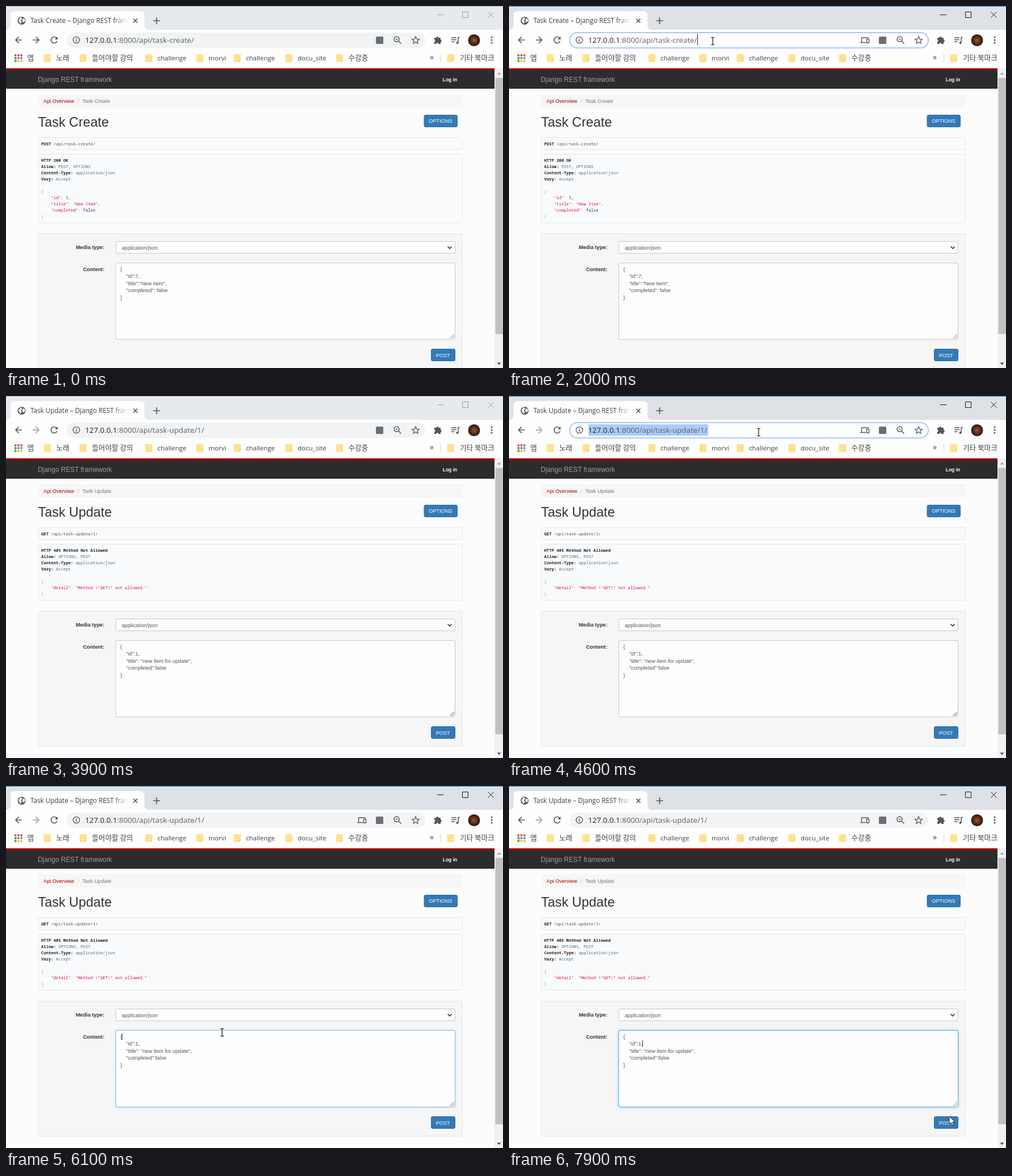
These frames come from a looping animation (876 px wide and 639 px high, 8000 ms). An HTML page:

```html
<!DOCTYPE html>
<html lang="en">
<head>
<meta charset="utf-8">
<title>API task demo</title>
<style>
html, body { margin: 0; width: 100%; height: 100%; overflow: hidden; background: #fcfcfc; }
svg { display: block; width: 876px; height: 639px; }
text { white-space: pre; }
.ui { font: 11.5px "Open Sans", "Noto Sans", sans-serif; fill: #3c4043; }
.ko { font: 12.6px "Noto Sans CJK KR", "Noto Sans CJK", sans-serif; fill: #3c4043; }
.url { font-size: 13.3px; fill: #5f6368; }
.url tspan { fill: #202124; }
.page { font: 9.2px "Liberation Sans", Arial, sans-serif; fill: #333; }
.h1 { font-size: 23.4px; }
.b, .code tspan.k { font-weight: bold; }
.code { font: 7.24px "Noto Sans Mono", monospace; fill: #555; }
.code .k { fill: #222; }
.code .l { fill: #4a6d8c; }
.code .s { fill: #d14; }
.code .p { fill: #93a1a1; }
.code .w { fill: #1e347b; }
.area { fill: #555; }
.line { fill: none; stroke: #54585c; stroke-width: 1.7; }
.btn rect { fill: #337ab7; stroke: #2e6da4; }
.btn text { fill: #fff; }
.ctl { fill: none; stroke: currentColor; }

/* every part shares one 8 s clock; 1% = 80 ms */
.t { animation: 8s step-end -20ms infinite; }
.create { animation-name: create; }
.update { animation-name: update; }
.strip { animation-name: strip; }
.edge { animation-name: edge; }
.ctl { animation-name: ctl; }
.act { animation-name: act; }
.ring { animation-name: ring; }
.sel { animation-name: sel; }
.pillhov { animation-name: pillhov; }
.bookhov { animation-name: bookhov; }
.caret0 { animation-name: caret0; }
.caret1 { animation-name: caret1; }
.caret2 { animation-name: caret2; }
.shown { animation-name: shown; }
.beam { animation-name: beam; }
.arrow { animation-name: arrow; }
.glow { animation-name: glow; animation-timing-function: linear; filter: drop-shadow(0 0 2.5px rgba(102,175,233,.7)); }
.move { animation-name: move; animation-timing-function: linear; }

@keyframes create { 0% { opacity: 1 } 47.5%, 100% { opacity: 0 } }
@keyframes update { 0% { opacity: 0 } 47.5%, 100% { opacity: 1 } }
@keyframes strip { 0%, 47.5% { fill: #e7eaed } 25%, 56.25%, 100% { fill: #dee1e6 } }
@keyframes edge { 0%, 47.5% { fill: #b4b6b8 } 25%, 56.25%, 100% { fill: #1883d7 } }
@keyframes ctl { 0%, 47.5% { color: #999b9d } 25%, 56.25%, 100% { color: #151515 } }
@keyframes act { 0%, 47.5% { opacity: 0 } 25%, 56.25%, 100% { opacity: 1 } }
@keyframes ring { 0%, 47.5%, 76.25%, 100% { opacity: 0 } 25%, 56.25% { opacity: 1 } }
@keyframes sel { 0%, 76.25%, 100% { opacity: 0 } 56.25% { opacity: 1 } }
@keyframes pillhov { 0%, 25%, 100% { fill: #f1f3f4 } 18.75% { fill: #e9ebee } }
@keyframes bookhov { 0%, 18.75%, 100% { opacity: 0 } 15% { opacity: 1 } }
@keyframes caret0 { 0%, 37.5%, 47.5%, 100% { opacity: 0 } 25%, 43.75% { opacity: 1 } }
@keyframes caret1 { 0%, 83.75%, 100% { opacity: 0 } 76.25% { opacity: 1 } }
@keyframes caret2 { 0%, 91.25% { opacity: 0 } 85%, 97.5%, 100% { opacity: 1 } }
@keyframes glow { 0%, 76.2% { opacity: 0 } 76.25% { opacity: .45 } 78.5%, 100% { opacity: 1 } }
@keyframes shown { 0%, 40% { opacity: 0 } 1.25%, 50%, 100% { opacity: 1 } }
@keyframes beam { 0%, 18.75%, 55%, 73%, 100% { opacity: 1 } 10%, 50%, 67%, 94.5% { opacity: 0 } }
@keyframes arrow { 0%, 18.75%, 55%, 73% { opacity: 0 } 10%, 50%, 67%, 94.5%, 100% { opacity: 1 } }
@keyframes move {
  0%, 1.25% { transform: translate(680px, 484px) }
  3.75% { transform: translate(700px, 524px) }
  7.5%, 8.75% { transform: translate(718px, 517px) }
  11.25%, 12.5% { transform: translate(328px, 162px) }
  16.25% { transform: translate(290px, 92px) }
  20%, 25% { transform: translate(358px, 62px) }
  31.25%, 48.75% { transform: translate(383px, 61px) }
  50% { transform: translate(560px, 330px) }
  56.25%, 58% { transform: translate(440px, 64px) }
  60%, 62.5% { transform: translate(456px, 62px) }
  65%, 66.5% { transform: translate(500px, 47px) }
  70% { transform: translate(742px, 200px) }
  73.75%, 75% { transform: translate(382px, 442px) }
  76.25%, 76.6% { transform: translate(381px, 435px) }
  80%, 82.5% { transform: translate(364px, 446px) }
  86.25%, 87.75% { transform: translate(364px, 453px) }
  96.25% { transform: translate(780px, 589px) }
  98.75%, 100% { transform: translate(776px, 583px) }
}
</style>
</head>
<body>
<svg viewBox="0 0 876 639">
<defs>
  <g id="folder">
    <path d="M2 0h9.500q1.500 0 1.500 1.500V10l-3 4H2q-1.500 0-1.500-1.500v-11Q.5 0 2 0z" fill="#ffe28f"/>
    <path d="M13 10l-3 4V11q0-1 1-1z" fill="#f3c653"/>
  </g>
  <linearGradient id="fade"><stop offset="0" stop-color="#fefefe" stop-opacity="0"/><stop offset="1" stop-color="#fefefe"/></linearGradient>
  <radialGradient id="face"><stop offset="0" stop-color="#a0572b"/><stop offset=".55" stop-color="#5c2d18"/><stop offset="1" stop-color="#241714"/></radialGradient>
  <clipPath id="tab"><path d="M40 10h174v30H40z"/></clipPath>
</defs>

<!-- browser frame -->
<rect class="t strip" width="876" height="42" fill="#e7eaed"/>
<rect class="t edge" width="876" height="1" fill="#b4b6b8"/>
<path d="M0 42Q8 42 8 34V17Q8 9 16 9H236Q244 9 244 17V34Q244 42 252 42H876V110H0z" fill="#fefefe"/>
<circle cx="27.500" cy="26" r="7" fill="#55595d"/>
<path d="M22 24q3-1 3-4l3 1q1 3-2 4l2 3-2 3q-3-1-4-7zM30 22l3 1 .5 4-3 2-2-3z" fill="#fefefe"/>
<g class="ui" clip-path="url(#tab)" style="font-size:11.700px">
  <text class="t create" x="43" y="30">Task Create – Django REST framework</text>
  <text class="t update" x="43" y="30">Task Update – Django REST framework</text>
</g>
<rect x="190" y="12" width="25" height="28" fill="url(#fade)"/>
<path class="line" d="M224.500 22.500l7 7m0-7l-7 7M265.500 20v12m-6-6h12"/>
<g class="t ctl">
  <path d="M760 15.500h11M804.500 10.500h10v10h-10zM849.500 10.500l10 10m0-10l-10 10"/>
</g>

<!-- address row -->
<path class="line" d="M28 60H17m5.500-5.500L17 60l5.500 5.500"/>
<path class="line" d="M47 60h11m-5.500-5.500L58 60l-5.500 5.500"/>
<path class="line t update" style="stroke:#bcbfc3" d="M47 60h11m-5.500-5.500L58 60l-5.500 5.500"/>
<path class="line" d="M89.500 57A5.500 5.500 0 1 0 90 62"/>
<path d="M91 54v5h-5z" fill="#54585c"/>
<rect class="t pillhov" x="107" y="47" width="632" height="27" rx="13.500" fill="#f1f3f4"/>
<rect class="t ring" x="107" y="47" width="632" height="27" rx="13.500" fill="#fefefe" stroke="#a9c9f6" stroke-width="2"/>
<circle class="line" cx="124" cy="60" r="5.700" style="stroke-width:1.300"/>
<path d="M123.300 59h1.500v4h-1.500zM123.300 56.700h1.500v1.400h-1.500z" fill="#54585c"/>
<rect class="t sel" x="140" y="50" width="211" height="20" fill="#abcaf8"/>
<g class="ui">
  <text class="url t create" x="139.500" y="65"><tspan>127.0.0.1</tspan>:8000/api/task-create/</text>
  <text class="url t update" x="139.500" y="65"><tspan>127.0.0.1</tspan>:8000/api/task-update/1/</text>
</g>
<rect class="t caret0" x="332" y="49" width="1" height="20" fill="#222"/>
<g class="t act">
  <path class="line" style="stroke-width:1.400" d="M634 56h-12.500v7.500M619 64.500h10M630.500 58.500h4v6.500h-4z"/>
</g>
<rect x="652" y="54" width="13" height="13" rx="1.500" fill="#6b6f74"/>
<g class="line" style="stroke-width:1.500">
  <circle cx="688.500" cy="58.500" r="4.500"/><path d="M692 62l4.500 4.500M686.500 58.500h4"/>
  <path d="M722 54l1.800 4.300 4.600.4-3.500 3 1 4.500-3.900-2.400-3.900 2.400 1-4.500-3.500-3 4.600-.4z" style="stroke-width:1.300"/>
  <path d="M785 56h9M785 59.500h9M785 63h5.500M797 65v-9.500h3"/>
</g>
<circle cx="795.500" cy="65" r="2" fill="#54585c"/>
<path d="M755 56h3.500a1.900 1.900 0 1 1 3.800 0H766v3.800a1.900 1.900 0 1 1 0 3.800V67h-3.700a1.900 1.900 0 0 0-3.800 0H755v-3.700a1.900 1.900 0 0 0 0-3.700z" fill="#54585c"/>
<circle cx="825" cy="60.500" r="10.500" fill="url(#face)"/>
<g fill="#54585c"><circle cx="856" cy="55" r="1.600"/><circle cx="856" cy="60" r="1.600"/><circle cx="856" cy="65" r="1.600"/></g>

<!-- bookmarks -->
<rect class="t bookhov" x="238" y="79" width="85" height="25" rx="12.500" fill="#eff1f2"/>
<g stroke-width="3.400" stroke-dasharray="3.400 1.800" fill="none">
  <path d="M15 87h14" stroke="#ea4335"/><path d="M15 92h14" stroke="#4285f4"/><path d="M15 97h14" stroke="#fbbc04"/>
  <path d="M15 92h4M15 97h4" stroke="#34a853"/>
</g>
<use href="#folder" x="66" y="85"/><use href="#folder" x="129" y="85"/>
<use href="#folder" x="245" y="85"/><use href="#folder" x="335" y="85"/>
<use href="#folder" x="401" y="85"/><use href="#folder" x="492" y="85"/>
<use href="#folder" x="581" y="85"/><use href="#folder" x="777" y="85"/>
<g class="ko">
  <text x="37.500" y="96">앱</text><text x="88.500" y="96">노래</text>
  <text x="151.500" y="96">들어야할 강의</text><text x="603.500" y="96">수강중</text>
  <text x="800" y="96">기타 북마크</text>
</g>
<g class="ui">
  <text x="267" y="96">challenge</text><text x="357" y="96">morvi</text>
  <text x="423" y="96">challenge</text><text x="514" y="96">docu_site</text>
  <text x="747" y="95" style="font-size:14px">»</text>
</g>
<path d="M766.500 84v16" stroke="#d5d7da"/>

<!-- web page -->
<rect y="110" width="861" height="529" fill="#fcfcfc"/>
<rect y="110" width="861" height="36" fill="#2c2c2c"/>
<rect y="110" width="861" height="3" fill="#a30000"/>
<rect x="861" y="110" width="15" height="529" fill="#f1f1f1"/>
<rect class="t create" x="862.500" y="127" width="13.500" height="452" fill="#c1c1c1"/>
<rect class="t update" x="862.500" y="127" width="13.500" height="470" fill="#c1c1c1"/>
<path d="M865.500 121l3.500-4 3.500 4z" fill="#a3a3a3"/><path d="M865.500 629.500l3.500 4 3.500-4z" fill="#505050"/>

<g class="page">
  <text x="56" y="134" style="font-size:11.850px;fill:#9d9d9d">Django REST framework</text>
  <text class="b" x="769.700" y="133" style="font-size:8.500px;fill:#fff">Log in</text>
  <rect x="57" y="156" width="748" height="23" rx="2.500" fill="#f6f6f6"/>
  <text x="66" y="171" style="fill:#a30000">Api Overview</text>
  <text x="126.500" y="171" style="fill:#bbb">/</text>
  <g class="t create">
    <text x="134.500" y="171" style="fill:#777">Task Create</text>
    <text class="h1" x="56.500" y="213">Task Create</text>
  </g>
  <g class="t update">
    <text x="134.500" y="171" style="fill:#777">Task Update</text>
    <text class="h1" x="56.500" y="213">Task Update</text>
  </g>
  <g class="btn"><rect x="737" y="192.500" width="58.500" height="21" rx="2.500"/><text x="745.300" y="206">OPTIONS</text></g>
</g>

<g fill="#f8fafb" stroke="#e1e8ed">
  <rect x="57" y="232" width="747.500" height="21.500" rx="2"/>
  <rect class="t create" x="57" y="261.500" width="747.500" height="121.500" rx="2"/>
  <rect class="t update" x="57" y="261.500" width="747.500" height="99" rx="2"/>
</g>
<g class="code t create">
  <text x="62" y="245.500"><tspan class="k">POST</tspan> /api/task-create/</text>
  <text x="62" y="274.500"><tspan class="k">HTTP 200 OK</tspan></text>
  <text x="62" y="285.500"><tspan class="k">Allow:</tspan><tspan class="l"> POST, OPTIONS</tspan></text>
  <text x="62" y="329.500" class="p">{</text>
  <text x="62" y="340.500">    <tspan class="s">"id"</tspan><tspan class="p">:</tspan> <tspan class="l">5</tspan>,</text>
  <text x="62" y="351.500">    <tspan class="s">"title"</tspan><tspan class="p">:</tspan> <tspan class="s">"New Item"</tspan>,</text>
  <text x="62" y="362.500">    <tspan class="s">"completed"</tspan><tspan class="p">:</tspan> <tspan class="w">false</tspan></text>
  <text x="62" y="373.500" class="p">}</text>
</g>
<g class="code t update">
  <text x="62" y="245.500"><tspan class="k">GET</tspan> /api/task-update/1/</text>
  <text x="62" y="274.500"><tspan class="k">HTTP 405 Method Not Allowed</tspan></text>
  <text x="62" y="285.500"><tspan class="k">Allow:</tspan><tspan class="l"> OPTIONS, POST</tspan></text>
  <text x="62" y="329.500" class="p">{</text>
  <text x="62" y="340.500">    <tspan class="s">"detail"</tspan><tspan class="p">:</tspan> <tspan class="s">"Method \"GET\" not allowed."</tspan></text>
  <text x="62" y="351.500" class="p">}</text>
</g>
<g class="code">
  <text x="62" y="296.500"><tspan class="k">Content-Type:</tspan><tspan class="l"> application/json</tspan></text>
  <text x="62" y="307.500"><tspan class="k">Vary:</tspan><tspan class="l"> Accept</tspan></text>
</g>

<!-- form, drawn once per page -->
<g class="t create">
  <g id="form" class="page">
    <rect x="57" y="402" width="747.500" height="238" rx="2.500" fill="#f6f6f6" stroke="#e3e3e3"/>
    <text class="b" x="173.500" y="429" text-anchor="end">Media type:</text>
    <text class="b" x="173.500" y="467.500" text-anchor="end">Content:</text>
    <g fill="#fdfdfd" stroke="#c8c8c8">
      <rect x="193.500" y="415.500" width="598" height="21" rx="2.500"/>
      <rect x="193.500" y="453.500" width="598" height="135" rx="2.500"/>
    </g>
    <path d="M778.500 424.500l3.500 3.500 3.500-3.500" fill="none" stroke="#333" stroke-width="1.600"/>
    <path d="M782.500 587l7.500-7.500M786.500 587l3.500-3.500" stroke="#777"/>
    <text class="area" x="204" y="429.500">application/json</text>
    <g class="btn"><rect x="749.500" y="605.500" width="42" height="21" rx="2.500"/><text x="757.700" y="619.500">POST</text></g>
  </g>
  <g class="page area">
    <text x="201.600" y="467.500">{</text>
    <text x="201.600" y="480">    "id":7,</text>
    <text x="201.600" y="492.600">    "title":"New Item",</text>
    <text x="201.600" y="505.200">    "completed": false</text>
    <text x="201.600" y="517.800">}</text>
  </g>
</g>
<g class="t update">
  <rect y="362" width="861" height="277" fill="#fcfcfc"/>
  <use href="#form" y="-22"/>
  <rect class="t glow" x="193.500" y="431.500" width="598" height="135" rx="2.500" fill="#fdfdfd" stroke="#66afe9"/>
  <path d="M782.500 565l7.500-7.500M786.500 565l3.500-3.500" stroke="#777"/>
  <g class="page area">
    <text x="201.600" y="445.500">{</text>
    <text x="201.600" y="458">    "id":1,</text>
    <text x="201.600" y="470.600">    "title": "new item for update",</text>
    <text x="201.600" y="483.200">    "completed":false</text>
    <text x="201.600" y="495.800">}</text>
  </g>
  <rect class="t caret1" x="204" y="437" width="1" height="11" fill="#222"/>
  <rect class="t caret2" x="235" y="449" width="1" height="11" fill="#222"/>
</g>

<!-- pointer -->
<g class="t shown"><g class="t move">
  <path class="t beam" d="M-3-6.500h2.200q.8 0 .8.800.0-.8.800-.8H3M0-6V6M-3 6.500h2.200q.8 0 .8-.8 0 .8.800.8H3" fill="none" stroke="#111" stroke-width="1.200"/>
  <path class="t arrow" d="M0 0v14l3.200-3 2.300 5 2.200-1-2.200-4.800H10z" fill="#fff" stroke="#111" stroke-width=".9"/>
</g></g>
</svg>
</body>
</html>
```
